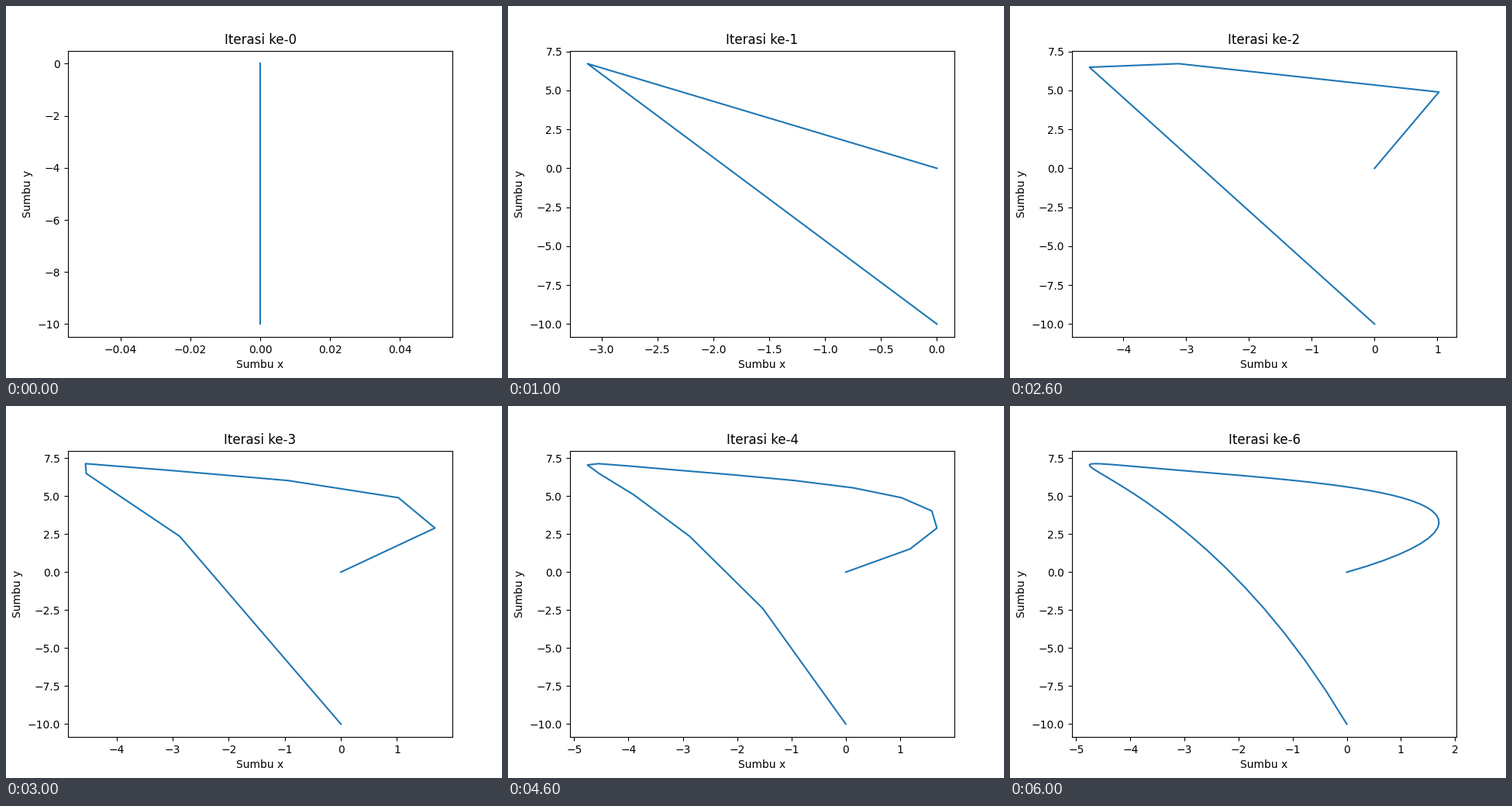
A matplotlib script for the animation above (7000 ms loop, 640x480 px).

```python
from math import comb

import matplotlib.pyplot as plt
import numpy as np
from matplotlib.animation import FuncAnimation

CONTROL = np.array([(0, 0), (5, 5), (0, 10), (-10, 0), (-5, 20), (0, -10)])
ITERATIONS = 7


def bezier(t):
    n = len(CONTROL) - 1
    weights = [comb(n, k) * t**k * (1 - t) ** (n - k) for k in range(n + 1)]
    return np.transpose(weights) @ CONTROL


fig, ax = plt.subplots(figsize=(6.4, 4.8), dpi=100)


def draw(iteration):
    # Each midpoint subdivision doubles the number of segments.
    x, y = bezier(np.linspace(0, 1, 2**iteration + 1)).T
    ax.clear()
    ax.plot(x, y)
    ax.set_title(f"Iterasi ke-{iteration}")
    ax.set_xlabel("Sumbu x")
    ax.set_ylabel("Sumbu y")


anim = FuncAnimation(fig, draw, frames=ITERATIONS, interval=1000, repeat=True, repeat_delay=0)
plt.show()
```
